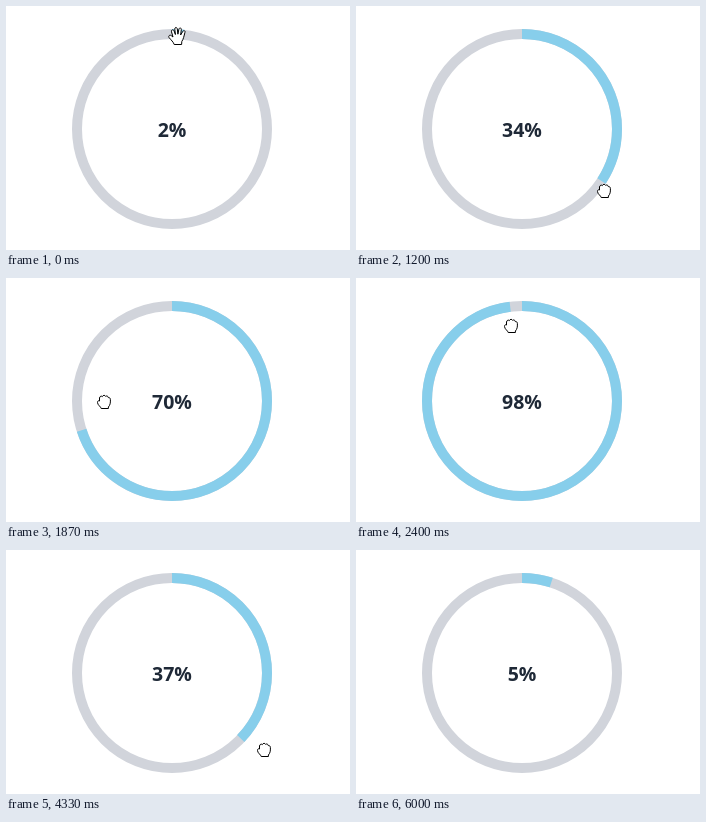
These frames come from a looping animation (344x244 px, 7190 ms). An HTML page:

```html
<!DOCTYPE html>
<html lang="en">
<head>
<meta charset="utf-8">
<title>Circular slider</title>
<style>
  html, body { margin: 0; width: 100%; height: 100%; overflow: hidden; background: #fff; }
  svg { display: block; width: 344px; height: 244px; }
  circle { fill: none; stroke-width: 10; }
  text { font: 700 19.5px "Open Sans", "Noto Sans", sans-serif; fill: #1f2937; text-anchor: middle; }
  #hand { fill: #fff; stroke: #000; stroke-linejoin: round; }
</style>
</head>
<body>
<svg viewBox="0 0 344 244">
  <circle cx="166" cy="123" r="95" stroke="#d1d4db"/>
  <circle id="arc" cx="166" cy="123" r="95" stroke="#87ceeb" pathLength="100" transform="rotate(-90 166 123)"/>
  <text id="label" x="166" y="131"></text>
  <path id="hand"/>
</svg>
<script>
const LOOP = 7190, TICK = 200 / 3, CX = 166, CY = 123;
const OPEN = 'M-4 1L-5.5-4.2C-6.2-6.2-3.6-7-2.9-5L-1.6-1.5L-2.2-6.8C-2.4-9-.1-9.2 .3-7L.9-1.8' +
  'L1.9-6.8C2.4-8.8 4.6-8.2 4.3-6.2L3.6-1L5.8-4.6C7-6.2 8.6-5 7.9-3.4' +
  'C7 0 6.5 3 4.8 5.5L4.6 8.5H-2.8C-3.5 6-6 4-8 1.5C-9-.5-6.6-1.6-5.3 0Z';
const FIST = 'M-4.5-1V-4C-4.3-6-2.2-6.2-1.6-5.4C-1-7.1 1-7.1 1.6-5.6C2.4-6.5 4.1-6 4.3-4.4' +
  'C5.4-4.8 6.4-3.8 6.4-2.4C6.5 1 6.2 3 4.4 5V6.5H-2.8C-3 4.8-6.5 3-6.5 .5C-6.5-1.2-5.5-1.6-4.5-1Z';

// Each drag: tick, value in %, pointer angle in % of a turn, pointer radius
const drags = [
  [[10, 2, .9, 93], [18, 34.2, 35.3, 103], [28, 70, 74.8, 68], [36, 98, 97.7, 76]],
  [[58, 52, 50.4, 77], [66, 35, 34, 126], [73, 9.3, 9, 80.5], [80, 5, 4.8, 81],
   [86, 5, 4.5, 81], [90, 5, 1.5, 145]]
];

const [arc, label, hand] = ['arc', 'label', 'hand'].map(id => document.getElementById(id));

// Linear between keys, held before the first and after the last
function pose(keys, tick) {
  const next = keys.findIndex(k => k[0] > tick);
  if (next < 0) return keys.at(-1);
  const b = keys[next], a = keys[next - 1] || b;
  const u = (tick - a[0]) / (b[0] - a[0] || 1);
  return a.map((v, j) => a === b ? v : v + (b[j] - v) * u);
}

function draw(now) {
  const tick = Math.floor((now % LOOP + 5) / TICK);
  const [, value, angle, radius] = pose(drags[tick < 58 ? 0 : 1], tick);
  const turn = angle * Math.PI / 50;
  arc.setAttribute('stroke-dasharray', `${value} 100`);
  label.textContent = Math.round(value) + '%';
  const x = Math.round(CX + radius * Math.sin(turn));
  const y = Math.round(CY - radius * Math.cos(turn));
  hand.setAttribute('d', tick < 3 || tick > 86 ? OPEN : FIST);
  hand.setAttribute('transform', `translate(${x} ${y})`);
  hand.style.display = tick < 90 ? '' : 'none';
}

const start = performance.now();
function loop() {
  draw(performance.now() - start);
  requestAnimationFrame(loop);
}
loop();
</script>
</body>
</html>
```
